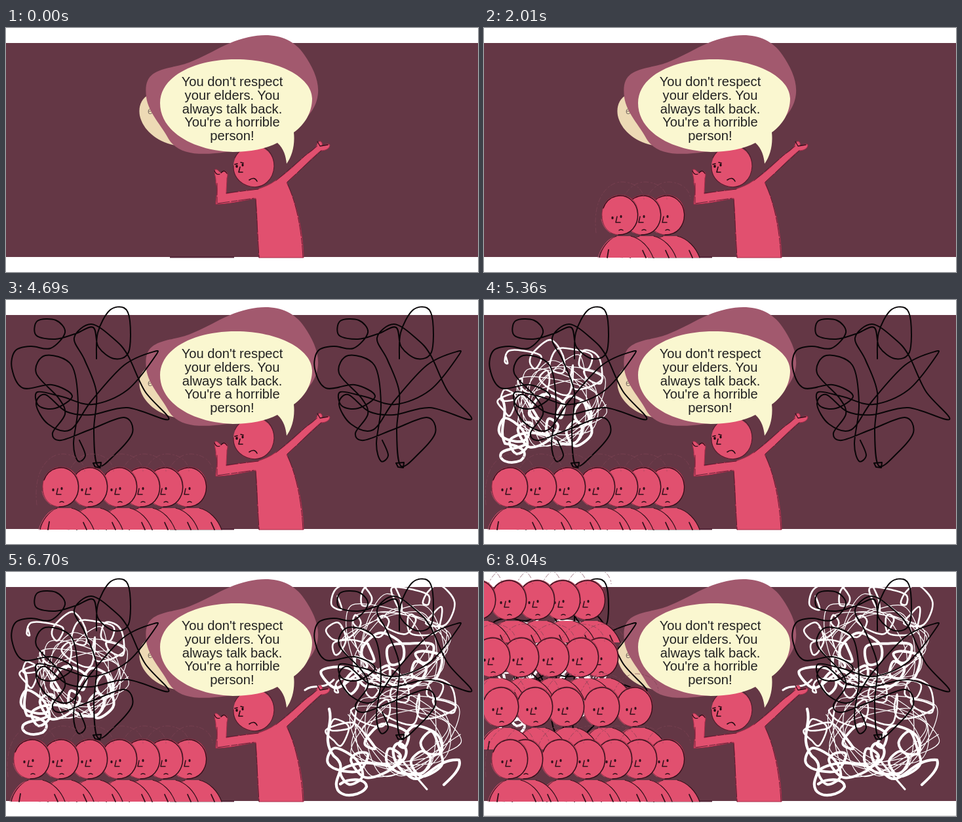
Recreate the animation shown at these times as an HTML page. Size 720 by 374 pixels, loop 8710 ms.

```html
<!DOCTYPE html>
<html lang="en">
<head>
<meta charset="utf-8">
<title>Growing crowd</title>
<style>
html, body { margin: 0; width: 100%; height: 100%; overflow: hidden; background: #fff; }
svg { display: block; width: 720px; height: 374px; }
.line { fill: none; stroke-linecap: round; stroke-linejoin: round; }
.pink { fill: #e1506f; }
.ink { stroke: #32101b; }
text { font-family: "Liberation Sans", Arial, sans-serif; }
</style>
</head>
<body>
<svg id="stage" viewBox="0 0 720 374" xmlns="http://www.w3.org/2000/svg"></svg>
<script>
const STEP = 670, LOOP = 8710;
const stage = document.getElementById('stage');

const line = (d, color, width, extra = '') =>
  `<path class="line" d="${d}" stroke="${color}" stroke-width="${width}" ${extra}/>`;
const show = (from, body, to = 13) => `<g data-from="${from}" data-to="${to}">${body}</g>`;

function random(seed) {
  return () => (seed = (seed * 16807) % 2147483647) / 2147483647;
}

// Smooth curve through the points
function curve(p) {
  let d = `M${p[0]}`;
  const at = i => p[Math.max(0, Math.min(p.length - 1, i))];
  for (let i = 0; i < p.length - 1; i++) {
    const [a, b, c, e] = [at(i - 1), at(i), at(i + 1), at(i + 2)];
    const mix = (m, n, o) => [0, 1].map(k => (m[k] + (n[k] - o[k]) / 6).toFixed(1));
    d += `C${mix(b, c, a)} ${mix(c, b, e)} ${c}`;
  }
  return d;
}

function person(x, y) {
  const head = 'M-27 3C-28-17-16-30 2-30C20-29 29-15 28 2C27 20 15 31-1 31C-17 30-26 19-27 3Z';
  const body = 'M-31 66C-29 52-20 36-5 33L19 33C34 38 45 51 51 66Z';
  return `<g transform="translate(${x} ${y})">
    ${line('M-36 28C-42-22-20-51 5-50C24-49 36-38 37-24', '#7e4455', .7, 'stroke-dasharray="7 4 2 3"')}
    <path class="pink" d="${body}"/><path class="pink" d="${head}"/>
    ${line(head, '#8d2942', .8)}
    ${line('M-25-10C-17-31 5-33 17-23C30-12 31 9 20 22C14 29 7 31-2 31', '#32101b', 1.4)}
    ${line('M-31 66C-28 52-18 38-5 33M17 33C33 37 45 50 51 66', '#32101b', 1.1)}
    ${line('M-33 66C-29 50-18 36-4 34M-28 7C-26 17-21 24-14 28', '#c4506b', .8)}
    ${line('M-17 54L-19 66M35 55L40 66', '#32101b', 1.8)}
    ${line('M-4 3L-6 12L1 12M-1 24Q2 22 5 24', '#32101b', 1.5)}
    <ellipse cx="-11" cy="5" rx="1.7" ry="2.2" fill="#32101b"/>
    <ellipse cx="2" cy="3" rx="1.6" ry="2.2" fill="#32101b"/>
  </g>`;
}

// Listed right to left, so the left ones stand in front
const row = (y, ...xs) => xs.map(x => person(x, y)).join('');

const tangle = curve([
  [138, 90], [140, 50], [158, 16], [180, 12], [189, 32], [187, 80], [165, 90], [141, 72],
  [133, 42], [105, 52], [75, 60], [46, 54], [48, 32], [76, 31], [90, 50], [68, 74], [38, 71],
  [14, 78], [9, 105], [26, 135], [70, 130], [101, 147], [75, 166], [50, 162], [48, 141],
  [85, 148], [132, 160], [185, 138], [227, 87], [226, 79], [180, 100], [130, 155], [98, 199],
  [64, 190], [46, 160], [60, 145], [92, 171], [130, 176], [185, 165], [248, 183], [212, 140],
  [186, 85], [165, 60], [130, 37], [104, 58], [120, 92], [138, 142], [134, 200], [140, 254],
  [168, 235], [193, 203], [180, 180], [130, 198], [84, 215], [71, 204], [90, 175], [80, 150],
  [46, 112], [60, 85], [100, 100], [110, 160], [103, 220], [110, 247], [121, 238], [112, 215]
]);
const blackTangle = dx => `<g transform="translate(${dx} 0)">
  ${line(tangle, '#080507', 2)}${line('M133 250L145 249L144 257L136 256Z', '#080507', 2)}</g>`;

// Loops rolling along a zigzag, plus thin wide sweeps at the right
function whiteTangle(x, y, w, h, seed, tail = '') {
  const rnd = random(seed), loops = [], sweeps = [];
  const route = [[.12, .1], [.8, .1], [.82, .3], [.2, .35], [.14, .5], [.75, .55], [.72, .75], [.15, .72], [.4, .85]];
  for (let i = 0; i < route.length - 1; i++) {
    const [a, b] = [route[i], route[i + 1]];
    const n = Math.ceil(Math.hypot(b[0] - a[0], b[1] - a[1]) * 26);
    for (let j = 0; j < n; j++) {
      const t = j / n, turn = loops.length * 1.25, r = .04 + rnd() * .08;
      loops.push([
        x + w * (a[0] + (b[0] - a[0]) * t + r * Math.cos(turn)),
        y + h * (a[1] + (b[1] - a[1]) * t + r * 1.2 * Math.sin(turn))
      ].map(v => +v.toFixed(1)));
    }
  }
  for (let i = 0; i < 26; i++) {
    const turn = i * 1.9;
    sweeps.push([
      x + w * (.55 + (.2 + rnd() * .25) * Math.cos(turn)),
      y + h * (.5 + (.22 + rnd() * .27) * Math.sin(turn))
    ].map(v => +v.toFixed(1)));
  }
  const cut = Math.floor(loops.length * .55);
  return line(curve(loops.slice(0, cut + 1)), '#fff', 2.6) +
    line(curve(loops.slice(cut)), '#fff', 4) + line(curve(sweeps), '#fff', 1.2) + tail;
}

const leftTail = line('M27 150C40 175 20 195 32 220C60 224 69 235 56 246C39 253 21 246 26 235C32 227 50 229 62 222', '#fff', 4);
const rightTail = line('M493 210C500 235 480 255 500 282C525 300 496 316 506 334C515 348 544 342 550 329C549 315 521 316 510 325M585 300C610 295 620 270 600 262C582 265 592 300 612 310C635 335 650 285 691 288C696 300 680 315 668 326', '#fff', 4.2) +
  line('M456 181C470 170 485 182 500 165M598 282L642 333', '#fff', 3);

const words = ["You don't respect", 'your elders. You', 'always talk back.', "You're a horrible", 'person!'];

const bubbles = `
  <path d="M219 102C205 108 202 122 204 134C209 158 234 178 266 181L249 100Z" fill="#eddab5"/>
  <text x="216" y="132" font-size="14" fill="#84766a">e</text>
  <path d="M214 106C210 72 225 66 257 59C300 51 327 23 370 14C406 6 437 14 455 41C470 63 481 87 474 111C462 153 397 184 337 190C294 196 263 194 248 170C238 150 217 130 214 106Z" fill="#a2596e"/>
  <path d="M235 115C235 75 286 48 351 48C416 48 467 76 467 108C467 129 456 148 439 160C441 178 437 196 428 208C427 197 424 185 414 176C397 185 372 190 346 190C284 188 235 158 235 115Z" fill="#faf7d0"/>
  <g font-size="20.2" fill="#222" text-anchor="middle">
    ${words.map((s, i) => `<text x="345" y="${89.3 + i * 20.6}">${s}</text>`).join('')}
  </g>`;

const bodyShape = 'M384 247C363 249 347 252 336 254C336 245 337 237 337 230C340 222 335 217 331 220C327 226 324 215 319 217C316 222 321 228 320 237C324 249 320 260 320 270C341 270 362 264 381 261C384 291 383 323 386 352L454 352C453 311 443 267 428 237C445 222 462 203 480 188C487 188 494 185 494 179C490 176 486 180 482 181C484 174 478 171 475 177C473 186 463 190 456 196C439 212 425 225 411 234C403 240 393 244 384 247Z';
const speaker = `
  <path class="pink" d="${bodyShape}"/>
  ${line(bodyShape, '#a82d4b', 1)}
  ${line('M322 238L322 269L378 261M336 253L385 247M412 234L457 195L476 180M429 236L481 188M381 263L386 352M430 240C443 269 451 310 453 352', '#49192a', .8, 'stroke-dasharray="18 3 9 2"')}
  ${line('M318 219Q321 226 326 224M328 222Q333 216 337 223M475 174L479 181L491 179', '#32101b', 1.3)}
  <ellipse class="pink" cx="378" cy="212" rx="31" ry="32"/>
  ${line('M347 211C346 224 354 239 373 243C393 247 408 232 409 212C409 199 403 188 394 183M349 199C353 191 358 187 363 184', '#541a2c', 1.1)}
  ${line('M357 213L355 221L361 221M371 233Q379 227 383 235M349 209L353 208M358 206L362 207', '#250b13', 1.6)}
  <ellipse cx="352" cy="212" rx="1.8" ry="2.3" fill="#250b13"/>
  <ellipse cx="361" cy="210" rx="1.6" ry="2.3" fill="#250b13"/>`;

stage.innerHTML = `
  <rect width="720" height="374" fill="#fff"/>
  <rect y="23" width="720" height="328" fill="#643745"/>
  <rect x="250" y="350" width="98" height="2.4" fill="#55283a"/>
  ${show(9, whiteTangle(462, 155, 258, 188, 77, rightTail))}
  ${show(10, whiteTangle(468, 18, 235, 190, 431))}
  ${speaker}${bubbles}
  ${show(8, whiteTangle(0, 68, 208, 185, 77, leftTail))}
  ${show(6, blackTangle(0))}
  ${show(7, blackTangle(462))}
  ${show(12, row(42, 157, 119, 80, 37, -10))}
  ${show(11, row(130, 177, 147, 102, 56, 12) + row(206, 229, 179, 125, 77, 25))}
  ${show(0, [278, 242, 207, 172, 127, 83, 39].map((x, i) =>
    show([1, 2, 3, 4, 5, 7, 8][i], person(x, 286))).join(''), 11)}
  ${show(11, row(286, 278, 236, 198, 157, 115, 62, 39))}
  ${show(12, '<rect y="373" width="720" height="1" fill="#ddd"/>')}`;

const parts = [...stage.querySelectorAll('[data-from]')];
const start = performance.now();

function draw() {
  const step = Math.floor(((performance.now() - start) % LOOP) / STEP);
  for (const part of parts) {
    const on = step >= +part.dataset.from && step < +part.dataset.to;
    part.style.display = on ? '' : 'none';
  }
  requestAnimationFrame(draw);
}
draw();
</script>
</body>
</html>
```
